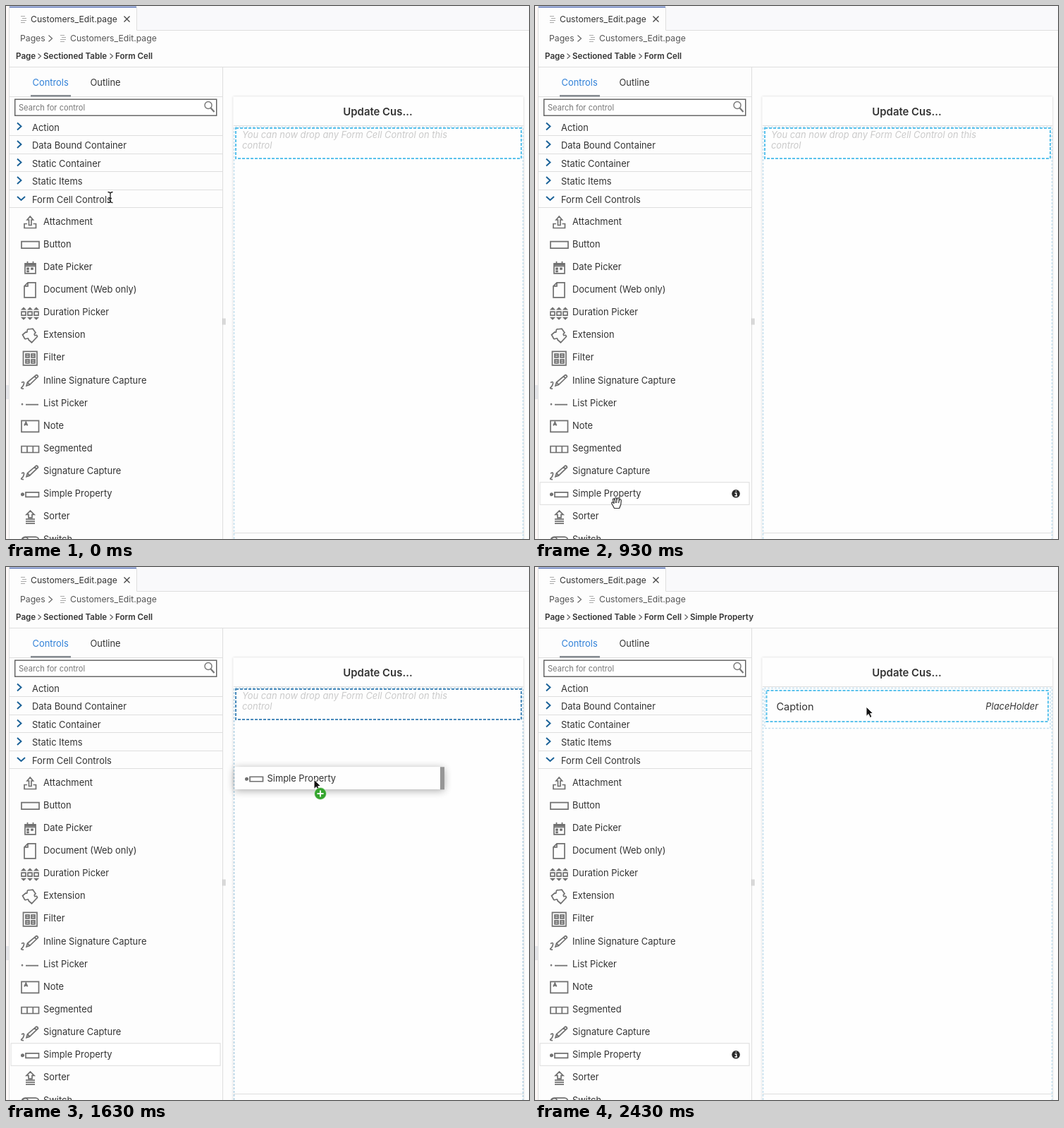
An HTML page that plays this animation: 742 by 755 pixels, repeating every 2960 ms.

```html
<!DOCTYPE html>
<html lang="en">
<head>
<meta charset="utf-8">
<title>Drag a control onto the page</title>
<style>
html, body { margin: 0; width: 100%; height: 100%; overflow: hidden; background: #fdfdfd; }
svg { display: block; width: 742px; height: 755px; font: 12.9px Inter, "Open Sans", sans-serif; fill: #333; }
.line { stroke: #dedede; fill: none; }
.crumb { font-size: 12.2px; fill: #555; }
.path { font-size: 11.6px; font-weight: 600; }
.icon { fill: none; stroke: #707070; stroke-width: 1.7; }
.chevron { fill: none; stroke: #175f96; stroke-width: 1.9; }
.arrowhead { fill: none; stroke: #666; stroke-width: 1.2; }
.hint { font-style: italic; font-size: 12.9px; fill: #cacaca; }
.dash { fill: none; stroke: #5bc2ec; stroke-width: 2; stroke-dasharray: 4 2; }
.outer { fill: none; stroke: #c3dfee; stroke-width: 1.5; stroke-dasharray: 3 2; }
.hot .dash { stroke: #4a8abb; }
.hot .outer { stroke: #b0d0e2; }
</style>
</head>
<body>
<svg viewBox="0 0 742 755">
  <defs>
    <filter id="soft" x="-10%" y="-100%" width="120%" height="300%">
      <feDropShadow dx="0" dy="2" stdDeviation="6" flood-opacity=".38"/>
    </filter>
    <filter id="faint" x="-5%" y="-5%" width="110%" height="110%">
      <feDropShadow dx="0" dy="0" stdDeviation="1.5" flood-opacity=".2"/>
    </filter>
  </defs>

  <rect width="742" height="755" fill="#fdfdfd"/>
  <rect width="4" height="755" fill="#fdf8f7"/>
  <rect y="537" width="4" height="20" fill="#e6e6ea"/>
  <path class="line" d="M4.5 0V755"/>

  <rect x="185" width="557" height="34" fill="#f9f9fb"/>
  <path class="line" d="M185.5 2V34.5H742M5 86.5H742M307.5 87V755"/>
  <path d="M5 1.5H185" stroke="#4a66b0" stroke-width="1.6"/>
  <g id="fileMarks"></g>
  <path d="M167.500 14.500l8 8m0-8l-8 8" stroke="#444" stroke-width="1.3"/>
  <g class="crumb">
    <text x="35" y="23" fill="#333">Customers_Edit.page</text>
    <text x="20" y="50">Pages</text>
    <text x="91" y="50">Customers_Edit.page</text>
  </g>
  <path class="arrowhead" d="M60.500 41.500l5 4.500-5 4.500"/>
  <g class="path">
    <text x="14" y="75">Page</text>
    <text x="53" y="75">Sectioned Table</text>
    <text x="155" y="75">Form Cell</text>
    <path class="arrowhead" d="M45.500 67.500l4 3.500-4 3.500m102-7l4 3.500-4 3.500"/>
    <g id="lastCrumb">
      <path class="arrowhead" d="M212.500 67.500l4 3.500-4 3.500"/>
      <text x="220" y="75">Simple Property</text>
    </g>
  </g>

  <text x="37.500" y="112.500" fill="#2f80d8">Controls</text>
  <text x="119.500" y="112.500">Outline</text>
  <path class="line" d="M5 128.500H307"/>
  <rect x="35" y="126" width="57" height="2.500" fill="#858b91"/>
  <rect x="12.700" y="132.200" width="286" height="23" fill="#fff" stroke="#5c5c5c" stroke-width="1.4"/>
  <text x="18" y="148" font-size="11.100" fill="#777">Search for control</text>
  <g fill="none" stroke="#777"><circle cx="287" cy="140.500" r="5" stroke-width="1.4"/><path d="M290.500 144.500l5 5.500" stroke-width="2.200"/></g>
  <g id="groups"></g>

  <g id="hover">
    <rect x="7" y="-16" width="297" height="31.500" fill="#fff" stroke="#dcdcdc"/>
    <g id="info">
      <circle cx="285" r="5.800" fill="#2b2b2b"/>
      <path d="M283.500 -.8H285.700V3M283.300 3.200H287M284.500 -3.600h1.500" stroke="#fff" stroke-width="1.300" fill="none"/>
    </g>
  </g>
  <g id="items"></g>
  <path d="M308 442.500v9m2.500-9v9" stroke="#bbb" stroke-width="1.300"/>

  <rect x="322.500" y="128.500" width="411.500" height="640" fill="#fefefe" filter="url(#faint)"/>
  <text x="527.500" y="155" text-anchor="middle" font-size="14.900" font-weight="600">Update Cus...</text>
  <path class="line" d="M323 169.500H734M323 746.500H734"/>

  <g id="canvas">
    <path class="outer" d="M323.500 755V171.500H733.500V755"/>
    <g id="empty">
      <text class="hint" x="335" y="187">You can now drop any Form Cell Control on this</text>
      <text class="hint" x="335" y="202">control</text>
    </g>
    <g id="filled">
      <text x="342.500" y="202.500" font-size="14.500">Caption</text>
      <text x="714" y="201.500" text-anchor="end" font-size="12.900" font-style="italic">PlaceHolder</text>
      <path id="rule" class="line" d="M328 220.500H729"/>
    </g>
    <rect id="cell" class="dash" x="326" y="173" width="405" height="43"/>
    <g id="selected">
      <path class="outer" d="M326 173.500V228.500H731V173.500"/>
      <rect class="dash" x="328.500" y="175" width="399.500" height="44"/>
    </g>
  </g>

  <g id="ghost">
    <g opacity=".9">
      <rect width="297" height="31.500" fill="#fff" filter="url(#soft)"/>
      <rect x="291.500" width="6" height="32" fill="#8b8b8b"/>
    </g>
    <g id="ghostIcon" class="icon" transform="translate(27.500 17)"></g>
    <text x="46" y="20.500">Simple Property</text>
  </g>

  <g id="cursor">
    <path id="beam" d="M-3.500 -7.500Q0 -7.500 0 -5V5Q0 7.500 -3.500 7.500M3.500 -7.500Q0 -7.500 0 -5V5Q0 7.500 3.500 7.500M-2 1.500H2" fill="none" stroke="#222" stroke-width="1.300"/>
    <path id="hand" d="M-3.500 7.500L-7 1Q-8-1.500-5.500-1L-4 .5-5.500-4.500Q-5.500-7-3.500-5.500L-2.700-3.500V-6.500Q-1.500-8.500-.2-6.500V-3.500L.8-6.800Q2.500-8 3.200-6V-3L4.200-5Q6-6 6.300-3.500L5.800 2 3.700 7.500ZM-2.700-3.500L-2 0M-.2-3.500V0M3.200-3L2.500 0" fill="#fff" stroke="#333" stroke-width="1.200" stroke-linejoin="round"/>
    <path id="arrow" d="M0 0V13.500L3.200 10.500 5.500 15.500 8 14.300 5.700 9.500H9.700Z" fill="#111" stroke="#fff"/>
    <g id="plus">
      <circle cx="9" cy="20" r="8.500" fill="#35a52e" stroke="#dff0dd" stroke-width=".8"/>
      <path d="M9 15.500V24.500M4.500 20H13.500" stroke="#fff" stroke-width="2"/>
    </g>
  </g>
</svg>

<script>
const LOOP = 2960, PITCH = 32.15, FIRST = 305;
const $ = id => document.getElementById(id);
const box = (x, y, w, h) => `M${x} ${y}h${w}v${h}h${-w}Z`;
const disc = (x, y, r) => `M${x - r} ${y}a${r} ${r} 0 1 0 ${2 * r} 0a${r} ${r} 0 1 0 ${-2 * r} 0Z`;

const pen = "M-5 7l1.500-5L9-8.500q2 0 2.500 2.500L-.500 5.500ZM6.500-6.500l2.500 2.500M-3.500 2L-.500 5.500M-12 2.500q4-2.500 3.500 1t-3 5.500 2.500 2";
const property = box(-6, -3, 18.500, 6.500) + disc(-10.500, 0, 1.700) + disc(-10.500, 0, .7);
const controls = [
  ["Attachment", "M-4 2.500H-8V8.500H8.500V2.500H4.500M-1.500 4.500V-3H-4L.2-8 4.500-3H2V4.500Z"],
  ["Button", box(-12, -4.500, 25, 9.500)],
  ["Date Picker", box(-7, -5.500, 15, 14) + "M-7-2H8M-7-4H8M-3.500-8.500v4m8-4v4" + box(-4, 1, 2, 1.500) + box(2, 1, 2, 1.500) + box(-4, 5, 2, 1)],
  ["Document (Web only)", "M-3-10.500H8V10.500H-8V-5.500ZM-3-10.500V-5.500H-8"],
  ["Duration Picker", [-9, 0, 9].map(x => box(x - 3, -1.500, 6, 5) + `M${x - 2}-5l2-2 2 2ZM${x - 2} 7l2 2 2-2Z`).join("")],
  ["Extension", "M-10.500-1l4.500-4q2.500 1.500 2-1.500 0-3 3-2.500L4-9.500 8-4q-3 2-1 4 3-1.500 3.500 1.500L2.500 10-2 6q0-3-3-1.500-2 1-3-1Z"],
  ["Filter", box(-9.500, -9.500, 19.500, 19.500) + [-6, 2].map(x => [-6, 2].map(y => box(x, y, 5, 5) + `M${x} ${y + 2.500}h5`).join("")).join("")],
  ["Inline Signature Capture", pen],
  ["List Picker", "M-6 1.500H12" + disc(-11, 1, .5)],
  ["Note", box(-12, -8, 24.500, 16) + "M-8-1l2.300-5 2.300 5M-7-2.500h3"],
  ["Segmented", box(-12, -4, 24.500, 9) + "M-4-4v9m8.300-9v9"],
  ["Signature Capture", pen],
  ["Simple Property", property],
  ["Sorter", "M-6 3H7M-6 6H7M-6 9H7M-2 1V-3.500H-5L.5-9 6-3.500H3V1Z"],
  ["Switch", "M-7-4H8a4.500 4.500 0 0 1 0 9H-7a4.500 4.500 0 0 1 0-9Z" + disc(-6.500, .5, 4)]
];

$("items").innerHTML = controls.map(([name, d], i) => {
  const y = FIRST + i * PITCH;
  return `<g><path class="icon" d="${d}" transform="translate(34 ${y + 1})"/><text x="53" y="${y + 4.500}">${name}</text></g>`;
}).join("");
$("ghostIcon").innerHTML = `<path d="${property}"/>`;

$("groups").innerHTML = ["Action", "Data Bound Container", "Static Container", "Static Items", "Form Cell Controls"].map((name, i) => {
  const y = 172 + i * 25.500;
  const chevron = i < 4 ? `M16 ${y - 6.500}l5.500 5-5.500 5` : `M16 ${y - 4}l5.500 5 5.500-5`;
  return `<path class="chevron" d="${chevron}"/><text x="37" y="${y + 4.500}">${name}</text>
    <path class="line" d="M5 ${Math.floor(y + 11.500)}.5H307"/>`;
}).join("");
$("fileMarks").innerHTML = [[21, 18], [77, 45]].map(([x, y]) =>
  `<path d="M${x} ${y - 3.500}h6m-4 3h6m-8 3h8m-8 3h6" stroke="#aaa" fill="none"/>`).join("");

const ticks = [0, 30, 130, 160, 230, 330, 360, 430, 500, 560, 630, 730, 760, 830, 930, 1030, 1060,
  1130, 1230, 1430, 1530, 1560, 1630, 1660, 1730, 1830, 1930, 2030, 2060, 2430];
const pointerPath = [[0, 148, 271], [30, 148, 276], [330, 130, 597], [500, 123, 640], [930, 116, 704], [1130, 116, 703],
  [1230, 155, 672], [1430, 290, 525], [1530, 411, 388], [1730, 463, 214], [1830, 470, 198]];
const ghostPath = [[1230, 10.500, 672.500], [1430, 155, 535], [1530, 294, 376.500], [1730, 355, 190], [1830, 363, 170.500]];

function along(path, t) {
  const next = path.findIndex(p => p[0] > t);
  if (next < 0) return path[path.length - 1].slice(1);
  if (next === 0) return path[0].slice(1);
  const a = path[next - 1], b = path[next], k = (t - a[0]) / (b[0] - a[0]);
  return [a[1] + (b[1] - a[1]) * k, a[2] + (b[2] - a[2]) * k];
}
const show = (id, on) => $(id).style.display = on ? "" : "none";
const move = (id, x, y) => $(id).setAttribute("transform", `translate(${x} ${y})`);

function draw(time) {
  const t = ticks.filter(tick => tick <= time).pop();
  const [x, y] = along(pointerPath, t);
  const dragging = t >= 1230 && t < 2030;
  const filled = t >= 1730, selected = t >= 2430, lifted = t === 1230;
  const row = t >= 1230 ? 12 : Math.floor((y - 289) / PITCH);

  move("cursor", x, y);
  show("beam", row < 0);
  show("hand", row >= 0 && t < 1230);
  show("arrow", t >= 1230);
  show("plus", dragging && x > 323);

  show("hover", row >= 0);
  move("hover", 0, FIRST + row * PITCH);
  show("info", !dragging);
  $("items").children[12].style.display = lifted ? "none" : "";

  show("ghost", dragging);
  move("ghost", ...along(ghostPath, t));

  $("canvas").setAttribute("class", dragging ? "hot" : "");
  show("empty", !filled);
  show("filled", filled);
  show("rule", !selected);
  show("cell", !selected);
  $("cell").setAttribute("height", filled ? 55 : 43);
  show("selected", selected);
  show("lastCrumb", selected);
}

const start = performance.now();
function frame() {
  draw((performance.now() - start) % LOOP);
  requestAnimationFrame(frame);
}
frame();
</script>
</body>
</html>
```
